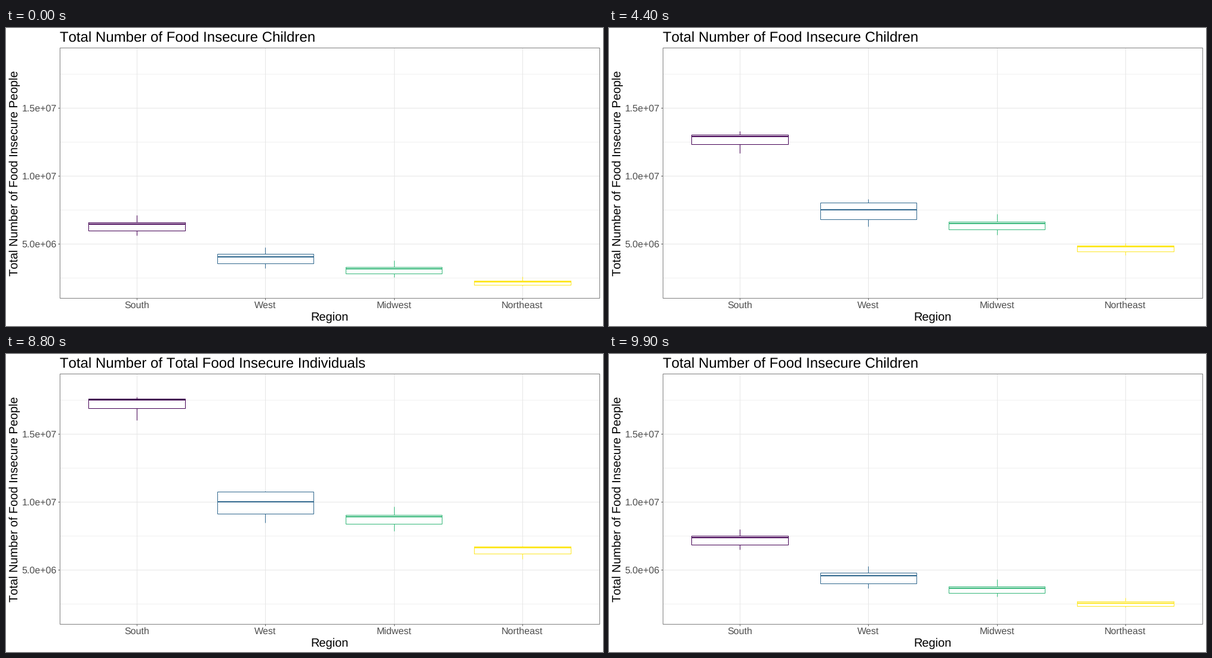
Recreate the animation shown at these times as a matplotlib script. Size 1000 by 500 pixels, loop 10000 ms.

```python
import matplotlib.pyplot as plt
import numpy as np
from matplotlib.animation import FuncAnimation
from matplotlib.patches import Rectangle

W, H, DPI = 1000, 500, 100
PX = 72 / DPI  # points per pixel

plt.rcParams.update({
    "font.family": "Liberation Sans",
    "text.hinting": "none",
    "text.kerning_factor": 6,  # plain advance widths
})

LEFT, RIGHT, TOP, BOTTOM = 90, 994, 33.4, 453.4
STEP = (RIGHT - LEFT) / 4.2
HALF_BOX = 0.375 * STEP
TITLES = ("Total Number of Food Insecure Children",
          "Total Number of Total Food Insecure Individuals")

# Stage heights of: upper whisker, upper quartile, median, lower quartile, lower whisker
REGIONS = [
    ("South", "#440154", (314, 326, 329, 340.4, 348), (52, 53.8, 56, 70.5, 91)),
    ("West", "#31688E", (368, 379, 383.5, 395.3, 403), (218.2, 219, 237.2, 257.8, 273.3)),
    ("Midwest", "#35B779", (389.5, 401, 403.5, 412, 417.5), (245, 259, 262.6, 274.5, 286.5)),
    ("Northeast", "#FDE725", (417, 423.5, 426, 430.5, 432.7), (313.8, 314.4, 317, 327, 336.7)),
]

FRAMES, INTERVAL = 100, 100
HALF, HOLD = 50, 37  # frames per state, and its last still frame

fig = plt.figure(figsize=(W / DPI, H / DPI), dpi=DPI, facecolor="white")
ax = fig.add_axes([0, 0, 1, 1])
ax.set(xlim=(0, W), ylim=(H, 0))
ax.axis("off")


def line(xs, ys, color, width=1, z=1):
    return ax.plot(xs, ys, color=color, lw=width * PX, zorder=z,
                   solid_capstyle="butt", snap=True)[0]


def text(x, y, label, size, color="black", ha="center", rotation=0):
    return ax.text(x, y, label, size=size * PX, color=color, ha=ha, va="baseline",
                   rotation=rotation, rotation_mode="anchor")


def value_y(value):
    return 248 - (value - 1e7) * 114.3 / 5e6


class Box:
    def __init__(self, x, color, start, end):
        self.start, self.end = np.array(start), np.array(end)
        self.whiskers = [line([x, x], [0, 0], color, z=3) for _ in range(2)]
        self.body = ax.add_patch(Rectangle((x - HALF_BOX, 0), 2 * HALF_BOX, 1, fc="white",
                                           ec=color, lw=PX, zorder=4, snap=True))
        self.median = line([x - HALF_BOX, x + HALF_BOX], [0, 0], color, 2, z=5)

    def move(self, t):
        high, q3, mid, q1, low = self.start + (self.end - self.start) * t
        self.whiskers[0].set_ydata([high, q3])
        self.whiskers[1].set_ydata([q1, low])
        self.body.set_y(q3)
        self.body.set_height(q1 - q3)
        self.median.set_ydata([mid, mid])


for minor in (2.5e6, 7.5e6, 1.25e7, 1.75e7):
    line([LEFT, RIGHT], [value_y(minor)] * 2, "#F0F0F0")

for major, label in ((5e6, "5.0e+06"), (1e7, "1.0e+07"), (1.5e7, "1.5e+07")):
    y = value_y(major)
    line([LEFT, RIGHT], [y, y], "#E6E6E6", z=2)
    line([LEFT - 3, LEFT], [y, y], "#555555")
    text(85, y + 5.8, label, 16, "#4D4D4D", ha="right")

boxes = []
for i, (name, color, start, end) in enumerate(REGIONS):
    x = LEFT + (0.6 + i) * STEP
    line([x, x], [TOP, BOTTOM], "#E6E6E6", z=2)
    line([x, x], [BOTTOM, BOTTOM + 3], "#555555")
    text(x, 470, name, 16, "#4D4D4D")
    boxes.append(Box(x, color, start, end))

ax.add_patch(Rectangle((LEFT, TOP), RIGHT - LEFT, BOTTOM - TOP, fill=False,
                       ec="#7F7F7F", lw=PX, zorder=6, snap=True))
title = text(90, 23, TITLES[0], 24, ha="left")
text((LEFT + RIGHT) / 2, 490.6, "Region", 20)
text(20, (TOP + BOTTOM) / 2, "Total Number of Food Insecure People", 20, rotation=90)


def draw(frame):
    state, k = divmod(frame, HALF)
    t = max(0, k - HOLD) / (HALF - HOLD)
    for box in boxes:
        box.move(1 - t if state else t)
    title.set_text(TITLES[state ^ (k >= 45)])
    return []


anim = FuncAnimation(fig, draw, frames=FRAMES, interval=INTERVAL,
                     repeat=True, repeat_delay=0, blit=False)
plt.show()
```
